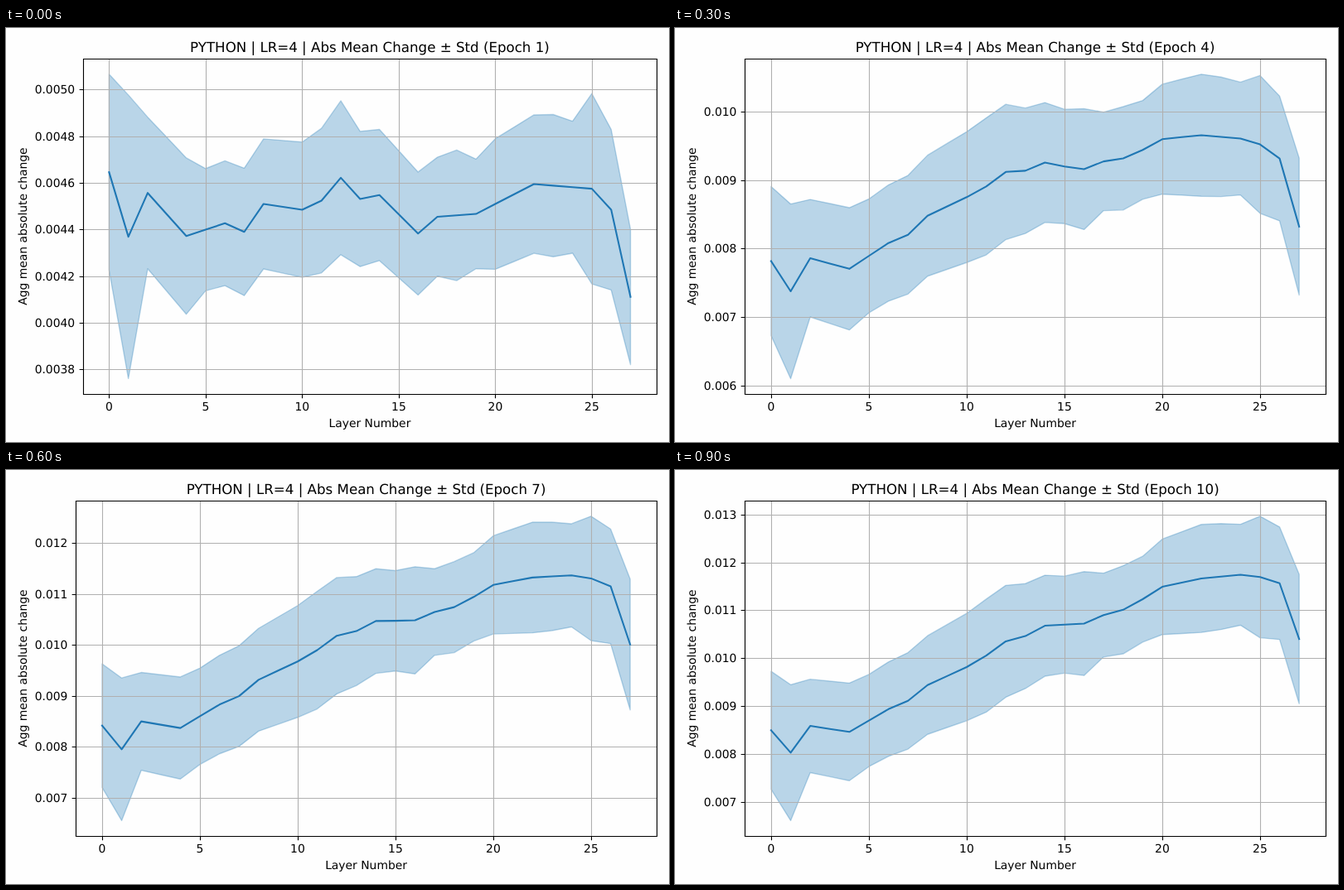
Recreate the animation shown at these times as an HTML page. Size 800 by 500 pixels, loop 1 s.

```html
<!DOCTYPE html>
<html lang="en">
<head>
<meta charset="utf-8">
<title>Layer change by epoch</title>
<style>
  html, body { margin: 0; width: 100%; height: 100%; overflow: hidden; background: #fefefe; }
  svg { display: block; width: 800px; height: 500px; }
  text { font: 13.89px "DejaVu Sans", sans-serif; text-rendering: geometricPrecision; text-anchor: middle; }
  text.title { font-size: 16.67px; }
  text.end { text-anchor: end; }
  path { fill: none; stroke: #000; stroke-width: 1.11; }
  path.grid { stroke: #b0b0b0; }
  path.band { fill: #1f77b4; fill-opacity: .31; stroke: #1f77b4; stroke-opacity: .3; stroke-width: 1.39; stroke-linejoin: round; }
  path.mean { stroke: #1f77b4; stroke-width: 2.08; stroke-linejoin: round; stroke-linecap: square; }
</style>
</head>
<body>
<svg id="chart" viewBox="0 0 800 500"></svg>
<script>
const TOP = 37.45, BOTTOM = 441.8, RIGHT = 785;
const STEP_MS = 100, EPOCHS = 10, LAYERS = 28;

const mix = (a, b, k) => a + (b - a) * k;

// Straight lines through { layer: value } points, one value per layer.
function curve(points) {
  const keys = Object.keys(points).map(Number);
  return Array.from({ length: LAYERS }, (_, i) => {
    const next = keys.findIndex(k => k >= i);
    const b = keys[next], a = b === i ? b : keys[next - 1];
    return a === b ? points[b] : mix(points[a], points[b], (i - a) / (b - a));
  });
}

// Values in thousandths: the first epoch, and the gain up to the last one.
const mean = curve({
  0: 4.646, 1: 4.369, 2: 4.557, 4: 4.372, 6: 4.427, 7: 4.39, 8: 4.51, 10: 4.485, 11: 4.524,
  12: 4.622, 13: 4.531, 14: 4.548, 16: 4.383, 17: 4.455, 19: 4.467, 22: 4.595, 25: 4.575, 26: 4.485, 27: 4.111
});
const meanGain = curve({
  0: 3.85, 1: 3.66, 2: 4.03, 4: 4.09, 8: 4.93, 14: 6.13, 18: 6.55, 20: 6.98, 24: 7.16, 26: 7.08, 27: 6.29
});
const std = curve({
  0: .42, 1: .608, 2: .325, 4: .335, 5: .262, 10: .29, 12: .33, 13: .29, 17: .255,
  18: .28, 19: .235, 20: .28, 23: .305, 24: .283, 25: .408, 26: .344, 27: .29
});
const stdGain = curve({
  0: .81, 1: .81, 2: .65, 8: .75, 11: .87, 15: .74, 16: .82, 17: .62, 19: .66, 22: .83, 24: .77, 25: .86, 26: .83, 27: 1.06
});
const speed = curve({ 0: 4.55, 10: 4.2, 15: 3.68, 25: 3.02, 27: 2.8 });

// Early layers settle sooner than late ones.
function growth(n, layer) {
  const t = (n - 1) / (EPOCHS - 1);
  return 1 - (1 - t) ** mix(speed[layer], 2.17, t * t);
}

const svg = document.getElementById("chart");
const crisp = v => Math.round(v) + .5;
const path = (cls, d) => `<path class="${cls}" d="${d}"/>`;
const text = (x, y, s, attrs = "") => `<text x="${x}" y="${y}" ${attrs}>${s}</text>`;

function draw(n) {
  const mid = mean.map((v, i) => v + meanGain[i] * growth(n, i));
  const spread = std.map((v, i) => v + stdGain[i] * growth(n, i));
  const upper = mid.map((v, i) => v + spread[i]);
  const lower = mid.map((v, i) => v - spread[i]);

  const min = Math.min(...lower), max = Math.max(...upper);
  const pad = (max - min) / 20, lo = min - pad, hi = max + pad;
  const step = hi - lo > 4 ? 1 : hi - lo > 2 ? .5 : .2;
  const digits = step < 1 ? 4 : 3;
  const left = digits === 4 ? 92.9 : 84.1;
  const margin = (RIGHT - left) / 22;
  const x = i => left + margin + i * (RIGHT - left - 2 * margin) / (LAYERS - 1);
  const y = v => BOTTOM - (v - lo) / (hi - lo) * (BOTTOM - TOP);
  const line = values => values.map((v, i) => `${x(i).toFixed(2)},${y(v).toFixed(2)}`);
  const [x0, x1, y0, y1] = [left, RIGHT, TOP, BOTTOM].map(crisp);

  let grid = "", ticks = "", labels = "";
  for (let i = 0; i < LAYERS; i += 5) {
    const gx = crisp(x(i));
    grid += `M${gx} ${y0}V${y1}`;
    ticks += `M${gx} ${y1}v4.86`;
    labels += text(x(i), 462, i);
  }
  for (let k = Math.ceil(lo / step); k * step <= hi; k++) {
    const gy = crisp(y(k * step));
    grid += `M${x0} ${gy}H${x1}`;
    ticks += `M${x0} ${gy}h-4.86`;
    labels += text(left - 9.7, gy + 4.5, (k * step / 1000).toFixed(digits), 'class="end"');
  }

  const center = (left + RIGHT) / 2, middle = (TOP + BOTTOM) / 2;
  svg.innerHTML =
    path("band", `M${line(upper).join("L")}L${line(lower).reverse().join("L")}Z`) +
    path("grid", grid) +
    path("mean", `M${line(mid).join("L")}`) +
    path("axis", `${ticks}M${x0} ${y0}H${x1}V${y1}H${x0}Z`) +
    labels +
    text(center, 482, "Layer Number") +
    text(0, 0, "Agg mean absolute change", `transform="translate(25 ${middle}) rotate(-90)"`) +
    text(center, 29, `PYTHON | LR=4 | Abs Mean Change ± Std (Epoch ${n})`, 'class="title"');
}

const start = performance.now();
let shown = 0;
function tick() {
  const n = Math.floor((performance.now() - start) / STEP_MS) % EPOCHS + 1;
  if (n !== shown) draw(shown = n);
  requestAnimationFrame(tick);
}
tick();
</script>
</body>
</html>
```
